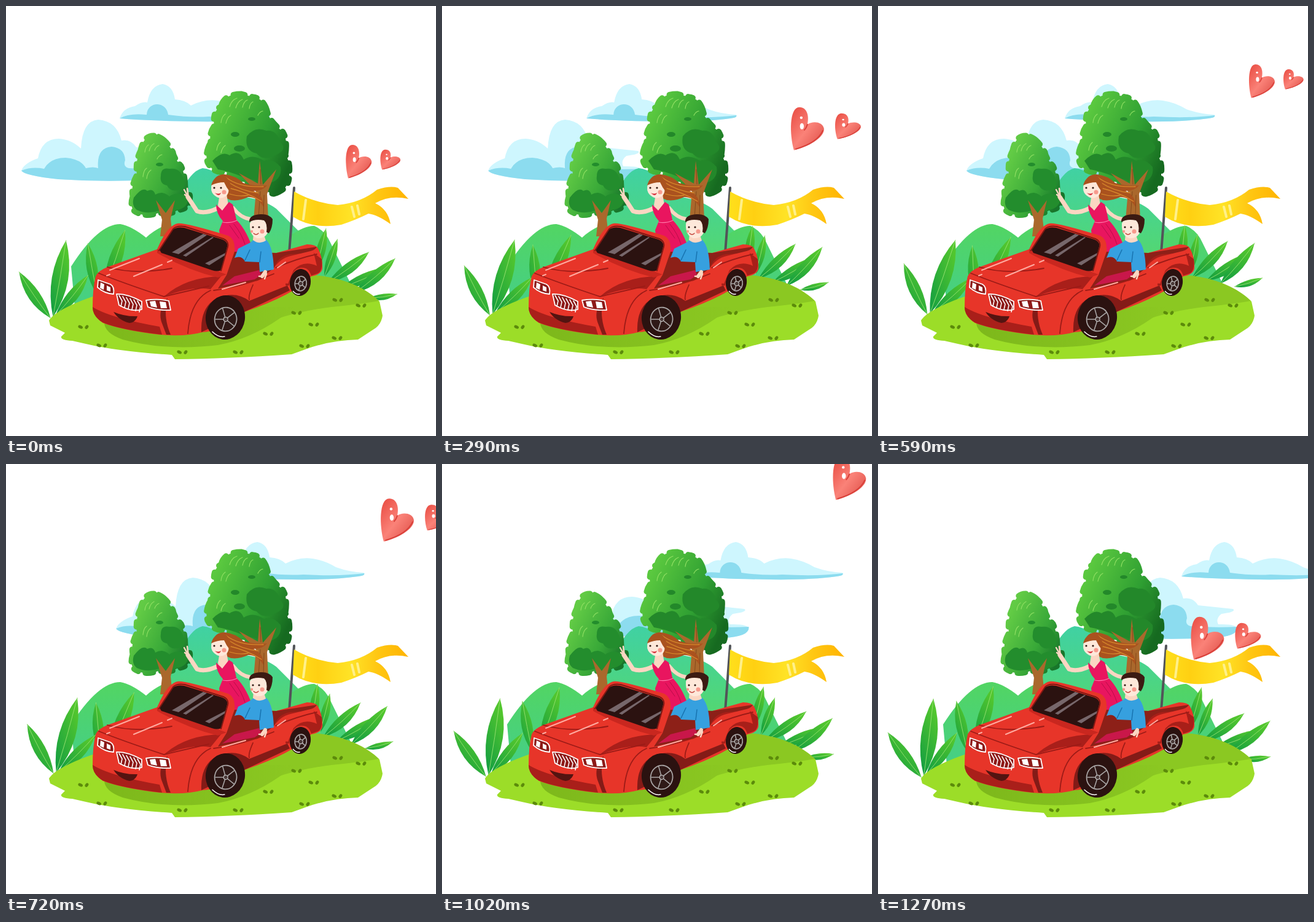
An HTML page that plays this animation: 700x700 px, repeating every 1.37 s.

```html
<!DOCTYPE html>
<html lang="en">
<head>
<meta charset="utf-8">
<title>Road trip</title>
<style>
html, body { margin: 0; width: 100%; height: 100%; overflow: hidden; background: #fff; }
svg { display: block; width: 100vw; height: 100vh; }
.line { fill: none; stroke-linecap: round; stroke-linejoin: round; }
.leafy { stroke-width: 9; stroke-linecap: round; stroke-dasharray: 13 13 20 13 8 12; }
</style>
</head>
<body>
<svg viewBox="0 0 700 700">
<defs>
  <linearGradient id="hill" x2="0" y2="1"><stop stop-color="#40d1a3"/><stop offset=".8" stop-color="#56d86a"/></linearGradient>
  <linearGradient id="hillLow" x2="0" y2="1"><stop stop-color="#52d563"/><stop offset="1" stop-color="#45cf86"/></linearGradient>
  <linearGradient id="treeA" gradientUnits="userSpaceOnUse" x1="212" y1="250" x2="305" y2="295"><stop stop-color="#62cb45"/><stop offset=".6" stop-color="#38a838"/><stop offset="1" stop-color="#18752a"/></linearGradient>
  <linearGradient id="treeB" gradientUnits="userSpaceOnUse" x1="335" y1="190" x2="466" y2="250"><stop stop-color="#5ac83f"/><stop offset=".6" stop-color="#2f9f32"/><stop offset="1" stop-color="#166a20"/></linearGradient>
  <linearGradient id="leaf" x1="0" y1="1" x2=".6" y2="0"><stop stop-color="#0f9b42"/><stop offset="1" stop-color="#52c62e"/></linearGradient>
  <linearGradient id="flag"><stop stop-color="#ffe01c"/><stop offset=".22" stop-color="#ffd012"/><stop offset=".5" stop-color="#ffe326"/><stop offset=".72" stop-color="#ffc814"/><stop offset="1" stop-color="#ffb300"/></linearGradient>
  <linearGradient id="love" x2="1" y2="1"><stop stop-color="#e8493f"/><stop offset=".5" stop-color="#fa8278"/><stop offset="1" stop-color="#dc4a43"/></linearGradient>
  <linearGradient id="shade" x2="1"><stop stop-color="#7db81b"/><stop offset="1" stop-color="#8bc822"/></linearGradient>
  <g id="heart">
    <path fill="url(#love)" d="M-22 35C-29 10-30-35-13-35C0-35 3-20 0-7C8-13 25-12 27 0C28 15 0 30-22 35Z"/>
    <path class="line" stroke="#d9403a" stroke-width="2" d="M0-7Q-2-1-5 2M-19 33Q16 23 25 3"/>
    <ellipse cx="-9" cy="-4" rx="3.2" ry="5" fill="#fff"/><circle cx="-10" cy="-18" r="2.2" fill="#fff"/>
  </g>
</defs>

<g id="clouds">
  <path fill="#cef6fe" d="M25 268Q29 256 52 248Q58 216 86 216Q106 217 122 232Q124 187 150 185Q180 187 188 219Q203 216 212 230L269 236Q275 241 250 244Q240 252 245 261Q277 260 276 269Q270 282 235 283Q160 287 85 282Q30 276 25 268Z"/>
  <path fill="#8cdcef" d="M25 268Q42 261 62 265Q72 247 97 247Q122 249 130 264Q142 261 150 264Q147 231 172 229Q193 231 194 251Q190 262 200 264Q240 267 276 265Q278 281 235 283Q160 287 85 282Q30 276 25 268Z"/>
  <path fill="#cef6fe" d="M185 183Q190 166 210 163Q222 155 230 157Q235 129 255 127Q272 130 275 152Q292 153 301 162Q323 151 345 154Q365 157 383 168Q405 176 429 177Q431 182 419 183Q375 189 310 188Q230 187 185 183Z"/>
  <path fill="#8cdcef" d="M185 183Q200 174 229 177C230 155 261 154 264 177Q300 182 330 180Q390 183 429 178Q431 182 419 183Q375 189 310 188Q230 187 185 183Z"/>
</g>

<g id="hearts"><use href="#heart"/><use href="#heart" transform="translate(66 -4) scale(.78 .6)"/></g>

<path fill="url(#hill)" d="M230 400Q255 360 280 312Q300 268 320 264Q345 265 385 310Q420 315 440 330L480 370L480 470H230Z"/>
<path fill="url(#hillLow)" d="M106 424Q150 355 186 355Q204 358 228 377Q240 365 265 354V490H112ZM465 372Q488 357 502 358Q520 366 528 385L560 450V475H465Z"/>

<path class="leafy" fill="url(#treeA)" stroke="url(#treeA)" d="M241 211Q224 210 219 235Q210 252 213 275Q203 292 206 310Q200 330 212 336Q230 345 250 336Q262 343 278 333Q300 330 299 316Q302 305 292 297Q292 275 285 260Q273 247 272 238Q258 212 241 211Z"/>
<g fill="#238d2d"><path d="M252 277Q252 262 266 265Q285 262 290 285Q293 297 283 299Q268 304 262 292Q250 290 252 277Z"/><ellipse cx="250" cy="258" rx="6" ry="3"/><path d="M208 312Q222 293 230 301Q240 296 243 307Q256 300 266 310Q279 300 298 312Q295 330 278 332Q262 340 250 333Q230 340 213 332Q204 325 208 312Z"/></g>
<path fill="#aa682c" d="M251 375L254 348L244 316L260 337L275 316L268 346L271 375Z"/>
<path class="line" stroke="#8fdf62" stroke-width="1.2" d="M226 238Q227 229 232 226M233 236Q235 227 241 224M242 235Q244 229 249 227M223 278Q224 267 229 264M229 281Q230 271 236 267M246 249Q249 243 254 242"/>

<path class="leafy" fill="url(#treeB)" stroke="url(#treeB)" d="M383 143Q355 143 350 163Q335 172 339 195Q330 207 333 222Q323 239 328 255Q338 274 358 270Q380 291 410 288Q425 305 436 306Q463 298 461 274Q464 255 455 243Q459 218 451 205Q433 190 427 178Q422 150 402 148Z"/>
<g fill="#23882a"><path d="M392 212Q405 195 424 203Q440 201 446 221Q458 232 444 240Q420 255 408 240Q388 236 392 212Z"/><path d="M336 252Q352 235 364 243Q380 233 387 250Q402 240 420 252Q436 248 447 262Q450 282 430 288Q402 284 385 278Q360 268 345 266Z"/><ellipse cx="373" cy="209" rx="7" ry="4"/><ellipse cx="400" cy="184" rx="6" ry="3"/><ellipse cx="380" cy="232" rx="9" ry="5"/></g>
<path fill="#aa682c" d="M403 348L407 302L379 272L410 289L413 252L418 291L440 266L425 306L427 348Z"/>
<path class="line" stroke="#83491c" d="M411 345L414 302M419 343L420 308M415 290L414 266"/>
<path class="line" stroke="#8fdf62" stroke-width="1.2" d="M364 164Q367 153 376 150M374 166Q377 155 385 152M385 165Q387 155 393 153M396 167Q397 158 402 156M350 190Q351 180 357 176M358 191Q360 181 366 178M343 235Q344 226 349 222M350 239Q352 230 357 227M410 178Q413 172 418 171"/>

<g id="backL"></g><g id="backR"></g><g id="frontL"></g><g id="frontR"></g>

<path fill="#9cdd28" d="M70 512Q80 495 138 474Q250 440 420 438C500 432 568 442 608 481L613 504Q611 517 602 524L573 543Q530 544 490 558L465 567Q360 574 275 575L270 568Q180 562 130 550L108 545Q88 544 90 538L96 532L72 520Z"/>
<path fill="#8bc822" d="M390 530Q450 500 530 490Q580 485 607 480C568 442 500 432 450 440L350 480Z"/>
<path fill="url(#shade)" d="M160 512Q158 532 190 543Q260 562 345 552Q410 540 470 490L300 490Z"/>
<g id="specks" fill="#5c8b0b"></g>

<path fill="#aa521e" d="M337 288Q340 274 356 274Q374 276 386 288Q405 294 425 292Q418 301 403 301Q420 309 419 327Q410 311 394 311Q380 318 366 316Q354 312 353 303Z"/>
<path class="line" stroke="#d88a2c" stroke-width="1.3" d="M358 279Q380 296 419 294M362 287Q385 302 410 304M362 296Q392 303 416 318M364 306Q380 311 394 308"/>
<g class="line" stroke="#fbd6c2" stroke-width="7"><path d="M345 329Q325 339 311 334L296 311"/><path d="M370 329Q382 345 398 347" stroke-width="6"/></g>
<path class="line" stroke="#fbd6c2" stroke-width="2.5" d="M298 313L290 299M297 312L295 297M297 312L291 307"/>
<path fill="#fbd6c2" d="M348 306H359L362 324L352 334L345 324Z"/>
<path fill="#fee8da" d="M335 290Q343 279 357 286Q367 299 359 309Q348 317 338 307Q332 301 335 290Z"/>
<path fill="#aa521e" d="M334 292Q338 275 357 277Q370 290 364 302Q359 296 355 287Q344 287 334 292Z"/>
<g fill="#2d1510"><circle cx="339" cy="296" r="1.6"/><circle cx="350" cy="296" r="1.6"/></g>
<circle cx="355" cy="303" r="3.5" fill="#f79a8d"/><path fill="#d9303b" d="M340 304Q345 307 350 304Q347 312 340 304Z"/>
<path fill="#e9155f" d="M342 323L352 333L363 319L369 323Q373 337 375 348Q393 366 403 400L352 406L347 365L353 350Q342 338 342 323Z"/>
<path class="line" stroke="#ff7bab" stroke-width="1.2" d="M353 352Q365 354 376 349"/>
<path class="line" stroke="#b80d49" d="M364 357L379 378M371 355Q384 371 389 388"/>

<path class="line" stroke="#525458" stroke-width="4" d="M469 296L461 402"/>
<path fill="url(#flag)" d="M469 302Q500 320 540 324Q579 320 604 299Q625 292 638 296L655 314Q625 307 601 321Q622 331 626 355Q605 340 590 338Q570 348 546 356Q500 364 467 343Z"/>
<path class="line" stroke="#fff08a" stroke-width="4" d="M563 327L567 343M572 325L575 339M488 316L484 347"/>

<path fill="#e73529" d="M146 440Q150 431 165 425L246 396Q262 358 279 354Q290 352 362 374Q374 380 372 400L440 402L490 388Q505 388 508 395Q516 410 515 428Q512 438 497 440Q470 470 388 498Q350 530 320 531Q290 539 250 535Q190 528 158 516Q141 505 141 490Q141 460 146 440Z"/>
<path fill="#8d2018" d="M372 400L440 402L506 392Q500 403 462 405Q443 408 437 426L410 447L345 460L359 438Z"/>
<path fill="#c9174a" d="M352 455L372 440L412 430L415 438L405 445Z"/>
<path fill="#a81f19" d="M437 426Q442 408 462 404L501 402L514 412Q516 430 508 435L497 439Q493 425 480 426Q464 428 461 455L455 455L458 420Z"/>
<path fill="#e73529" d="M435 428Q446 411 463 407L500 398L506 423Q484 413 468 430L459 452L427 447Z"/>
<path fill="#a91f1a" d="M257 473Q293 441 350 440L333 461Q304 455 257 473ZM141 490Q170 508 250 522L254 535Q185 527 157 515Q141 505 141 490Z"/>
<path fill="#c9271f" d="M246 396L359 437L345 442Q295 430 246 402Z"/>
<path fill="#841b17" d="M263 475Q247 494 253 514L261 535L268 535Q255 505 263 475ZM318 531Q316 487 347 474Q375 464 396 480L458 455L462 463L388 498Z"/>
<path class="line" stroke="#9c1b17" stroke-width="1.8" d="M151 435Q188 450 257 473L330 456M165 425Q210 438 270 427M333 463Q300 478 296 533M338 463Q385 457 436 436M402 454Q394 472 396 478M439 426Q474 411 506 404"/>
<path class="line" stroke="#ffaaa0" stroke-width="2" d="M169 430L217 411M164 439L169 437M208 440L254 421M263 417L270 414M352 461L390 450M442 426L455 417"/>

<path fill="#2b1210" d="M250 397L272 364Q278 359 290 361L352 380Q362 384 360 392L350 430Q345 433 335 430L253 402Z"/>
<path fill="#77676b" d="M270 401L321 371L327 373L281 404ZM288 406L336 376L338 377L293 408ZM324 419L357 402L356 406L331 422Z"/>
<path class="line" stroke="#801813" stroke-width="2" d="M249 398L272 363Q278 357 291 359L354 379Q363 383 361 392L350 431"/>

<g stroke="#fff" stroke-width="1.8" fill="#8d1a18" stroke-linejoin="round">
  <path d="M150 446L170 453Q177 457 175 469Q160 468 149 458Z"/>
  <path d="M228 479Q249 476 265 480L268 495Q247 496 231 490Z"/>
  <path d="M180 469Q197 468 221 481L221 494Q205 499 184 487Z"/>
</g>
<path fill="#fff" d="M154 450L160 453L159 462L153 459ZM164 455L170 458L170 465L164 463ZM234 481L243 480L246 491L236 489ZM250 481L260 482L262 492L252 492Z"/>
<path class="line" id="grille" stroke="#fff" stroke-width="1.6"/>
<path fill="#541411" d="M175 498Q194 506 214 505Q211 515 201 516Q184 512 175 498Z"/>

<g id="wheels"></g>

<path fill="#36a0df" d="M372 410L378 395L398 385L405 379L424 381Q435 392 436 429L413 433L412 417L389 416Q384 405 372 410Z"/>
<path class="line" stroke="#1772af" stroke-width="1.5" d="M413 417L415 400M389 414L397 397"/>
<path class="line" stroke="#fbd6c2" stroke-width="6" d="M422 433L417 440"/><path class="line" stroke="#fbd6c2" stroke-width="2.5" d="M424 436L421 444M416 440L412 440"/>
<path fill="#fbd6c2" d="M403 370H419L423 382Q412 389 402 381Z"/>
<path fill="#fee8da" d="M397 354Q399 344 417 346Q430 350 427 365Q424 379 409 378Q396 374 397 354Z"/>
<path fill="#3b1a12" d="M396 352Q395 340 414 339Q428 338 434 347Q434 361 428 370L424 368Q426 354 420 349Q405 346 396 352Z"/>
<g fill="#2d1510"><circle cx="402" cy="360" r="1.6"/><circle cx="412" cy="360" r="1.6"/></g>
<circle cx="417" cy="367" r="3.5" fill="#f79a8d"/><circle cx="400" cy="367" r="2.2" fill="#f79a8d"/>
<path class="line" stroke="#c4453e" stroke-width="1.3" d="M403 370Q407 374 411 370"/>
</svg>

<script>
const $ = id => document.getElementById(id);

function blade(x, y, [tx, ty]) {
  const dx = tx - x, dy = ty - y, bend = dx * .06;
  const ctrl = k => `${x + dx / 2 - dy * k} ${y + dy / 2 + dx * k}`;
  const sag = bend / Math.hypot(dx, dy);
  return `<path fill="url(#leaf)" d="M${x} ${y}Q${ctrl(sag + .21)} ${tx} ${ty}Q${ctrl(sag - .21)} ${x} ${y}Z"/>
    <path class="line" stroke="#96e070" stroke-width=".9" d="M${x} ${y}Q${ctrl(sag)} ${tx} ${ty}"/>`;
}

// Blades root at even steps from (x, y) and reach for the given tips
function clump(id, x, y, stepX, stepY, ...tips) {
  $(id).innerHTML = tips.map((tip, i) => blade(x + i * stepX, y + i * stepY, tip)).join('');
}
clump('backL', 150, 470, 13, -10, [137, 387], [198, 367]);
clump('backR', 502, 430, 14, 10, [517, 361], [536, 378]);
clump('frontL', 74, 507, 4, -2, [25, 430], [103, 381], [137, 439]);
clump('frontR', 522, 448, 22, 8, [587, 397], [616, 421], [630, 406], [635, 464]);

function specks(x, y) {
  return `<g transform="translate(${x} ${y})"><ellipse cx="-5" cy="3" rx="4" ry="2.5" transform="rotate(25)"/>
    <ellipse cx="4" cy="-2" rx="2.5" ry="3.5" transform="rotate(35)"/></g>`;
}
$('specks').innerHTML = [[127, 522], [157, 552], [288, 563], [379, 563], [428, 533], [474, 499], [502, 518],
  [487, 553], [540, 540], [541, 478], [579, 487]].map(p => specks(...p)).join('');

let chevrons = '';
for (let i = 0; i < 6; i++) chevrons += `M${184 + i * 6} ${471 + i * 1.8}l5 9l-2 9`;
$('grille').setAttribute('d', chevrons);

function wheel(x, y, rx, ry) {
  let spokes = '';
  for (let a = .5; a < 6; a += Math.PI * 2 / 5) spokes += `M0 0L${rx * .52 * Math.cos(a)} ${ry * .5 * Math.sin(a)}`;
  return `<g transform="translate(${x} ${y}) rotate(8)"><ellipse rx="${rx}" ry="${ry}" fill="#2b1210"/>
    <g transform="translate(1 ${ry * .08})"><ellipse rx="${rx * .56}" ry="${ry * .54}" fill="#2f1917" stroke="#a9a5a5" stroke-width="1.8"/>
    <path class="line" stroke="#a9a5a5" stroke-width="1.6" d="${spokes}"/><circle r="3.5" fill="#4b3a39" stroke="#ccc"/></g>
    <path class="line" stroke="#fff" stroke-width="1.5" d="M${-rx * .55} ${ry * .72}Q${-rx * .2} ${ry * .95} ${rx * .1} ${ry * .86}"/></g>`;
}
$('wheels').innerHTML = wheel(357, 507, 32, 36) + wheel(479, 450, 17, 22);

const LOOP = 1370, TICK = LOOP / 41;
const pauses = [[0, 100], [590, 660], [720, 790], [1170, 1240], [1270, LOOP]];

// Time in whole ticks, standing still during the pauses
function stepped(t) {
  const pause = pauses.find(([from, to]) => t >= from && t < to);
  return pause ? pause[0] : Math.floor(t / TICK + .1) * TICK;
}

function along(t, points) {
  const i = Math.max(1, points.findIndex(p => p[0] >= t));
  const [t0, v0] = points[i - 1], [t1, v1] = points[i];
  return v0 + (v1 - v0) * (t - t0) / (t1 - t0);
}

const drift = [[0, 0], [490, 92], [890, 200], [1140, 252], [1270, 309]];
const sway = t => 10.5 - 17.5 * Math.abs((t - 480 + LOOP * 1.5) % LOOP - LOOP / 2) / (LOOP / 2);

function heartAt(t) {
  if (t >= 1130) return [509 + .21 * (t - 1140), 324 - .31 * (t - 1140)];
  const age = Math.max(t, 45);
  return [570 + .093 * age, 264 - .24 * age];
}

const set = (id, transform) => $(id).setAttribute('transform', transform);

function draw(now) {
  const t = stepped(now % LOOP), angle = sway(t);
  const beat = t / (LOOP / 5) % 1 < .5 ? .78 : 1;
  set('clouds', `translate(${along(t, drift)})`);
  set('hearts', `translate(${heartAt(t)}) scale(${beat})`);
  set('frontL', `rotate(${angle} 114 552)`);
  set('backL', `rotate(${angle * .75} 114 552)`);
  set('frontR', `rotate(${-angle} 472 522)`);
  set('backR', `rotate(${-angle * .8} 472 522)`);
  requestAnimationFrame(draw);
}
draw(0);
</script>
</body>
</html>
```
